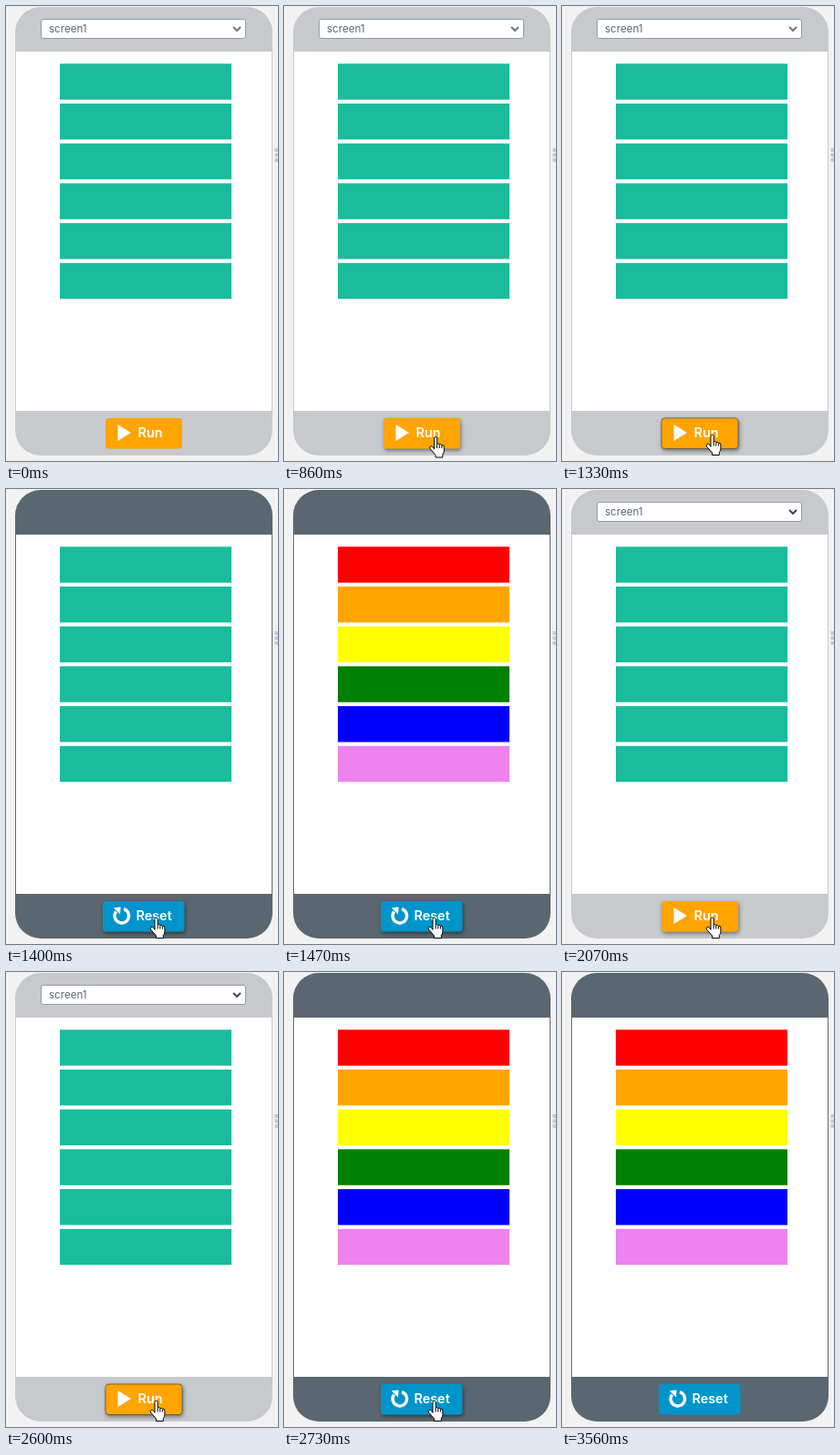
Animation, 298 px wide and 499 px high, one loop 4430 ms. Source, as an HTML page:

```html
<!DOCTYPE html>
<html lang="en">
<head>
<meta charset="utf-8">
<title>Run and reset</title>
<style>
  html, body { margin: 0; width: 100%; height: 100%; overflow: hidden; background: #f2f2f2; }
  svg { display: block; width: 100vw; height: 100vh; }
  text { font-family: Inter, "Open Sans", sans-serif; }
  .label { font-size: 14.4px; font-weight: 600; fill: #fff; }
  .hover { filter: drop-shadow(1px 2px 2px rgba(0, 0, 0, .45)); }
  .press { stroke: rgba(65, 65, 65, .65); }
</style>
</head>
<body>
<svg viewBox="0 0 298 499">
  <rect width="298" height="499" fill="#f2f2f2"/>
  <g fill="#c5c9cc">
    <rect x="294.5" y="156" width="4" height="4"/>
    <rect x="294.5" y="161.5" width="4" height="4"/>
    <rect x="294.5" y="167" width="4" height="4"/>
  </g>
  <rect id="body" x="10" y="1" width="282" height="492" rx="28"/>
  <rect x="11" y="50" width="280" height="394" fill="#fff"/>
  <g id="bars"></g>

  <g id="select">
    <rect x="38.5" y="14.5" width="224" height="21" rx="2.5" fill="#fff" stroke="#949ca2"/>
    <text x="47" y="29" font-size="11.6" fill="#5b6770">screen1</text>
    <path id="chevron" d="M249 23l4 4 4-4" fill="none" stroke-width="2"/>
  </g>

  <g id="run">
    <rect x="109" y="452" width="84" height="33.5" rx="3.5" fill="#ffa400"/>
    <path d="M122.5 459L137 468L122.5 477z" fill="#fff"/>
    <text class="label" x="144.5" y="473">Run</text>
  </g>
  <g id="reset">
    <rect x="106" y="452" width="89.5" height="33.5" rx="3.5" fill="#0094ca"/>
    <path d="M129 460.6A7.8 7.8 0 1 1 120.6 463.4" fill="none" stroke="#fff" stroke-width="3.4"/>
    <path d="M117.8 459.2L125.6 458.4L125 466.4z" fill="#fff"/>
    <text class="label" x="142.5" y="473">Reset</text>
  </g>

  <g id="cursor" fill="#fff" stroke="#000" stroke-linejoin="round">
    <path id="hand" d="M5.5 14V2.2a1.6 1.6 0 0 1 3.2 0V8.3q1.6-.8 2.6.6 1.6-.7 2.6.8 2.3-.4 2.5 1.9V16q0 2-1.6 4V23H7V20.5L1.2 13.7q-1.3-2 .3-2.8 1.5-.6 2.6.9L5.5 13.6M8.7 8.5V13M11.3 9.2V13M13.9 10V13"/>
    <path id="arrow" d="M6.5 1V17L10.2 13.5 12.7 19.3 15.2 18.2 12.7 12.6H17.8z"/>
  </g>
</svg>
<script>
const LOOP = 4430;
const TEAL = '#1abc9c';
const RAINBOW = ['red', 'orange', 'yellow', 'green', 'blue', 'violet'];
const $ = id => document.getElementById(id);

const bars = RAINBOW.map((c, i) => {
  const r = document.createElementNS('http://www.w3.org/2000/svg', 'rect');
  const box = { x: 59, y: 63.3 + i * 43.7, width: 188, height: 39.4 };
  for (const k in box) r.setAttribute(k, box[k]);
  return $('bars').appendChild(r);
});

// [time, cursor x, y, shape]
const moves = [
  [0, 0, 0, ''],
  [190, 254, 488, 'arrow'],
  [260, 240, 485, 'arrow'],
  [330, 217, 483, 'arrow'],
  [400, 195, 481, 'arrow'],
  [460, 173, 478, 'hand'],
  [530, 163, 475, 'hand'],
  [600, 160, 474, 'hand'],
  [860, 159, 472, 'hand'],
  [930, 159, 471.5, 'hand'],
  [1000, 158.5, 471, 'hand'],
  [1070, 158, 470.5, 'hand'],
  [1150, 157.5, 469.5, 'hand'],
  [3160, 158, 470, 'hand'],
  [3360, 164, 476, 'hand'],
  [3430, 178, 484, 'arrow'],
  [3490, 189, 493, 'arrow'],
  [3560, 0, 0, '']
];

// [time, running, coloured bars, pressed]
const states = [
  [0, 0, 0, 0],
  [1330, 0, 0, 1],
  [1400, 1, 0, 0],
  [1470, 1, 1, 0],
  [1930, 1, 1, 1],
  [2000, 0, 1, 0],
  [2070, 0, 0, 0],
  [2470, 0, 0, 1],
  [2660, 1, 0, 0],
  [2730, 1, 1, 0]
];

const at = (table, t) => table.findLast(row => row[0] <= t);
const show = (id, on) => { $(id).style.display = on ? '' : 'none'; };

function draw(now) {
  const t = now % LOOP;
  const [, x, y, shape] = at(moves, t);
  const [, running, coloured, pressed] = at(states, t);

  $('body').setAttribute('fill', running ? '#5b6770' : '#c6cacd');
  $('chevron').setAttribute('stroke', t < 1400 ? '#70777c' : '#454a4e');
  bars.forEach((b, i) => b.setAttribute('fill', coloured ? RAINBOW[i] : TEAL));
  show('select', !running);
  show('run', !running);
  show('reset', running);
  for (const id of ['run', 'reset']) {
    $(id).setAttribute('class', shape === 'hand' ? 'hover' : '');
    $(id).firstElementChild.setAttribute('class', pressed ? 'press' : '');
  }
  show('hand', shape === 'hand');
  show('arrow', shape === 'arrow');
  $('cursor').setAttribute('transform', `translate(${x} ${y})`);
}

const start = performance.now();
function tick() {
  draw(performance.now() - start);
  requestAnimationFrame(tick);
}
tick();
</script>
</body>
</html>
```
